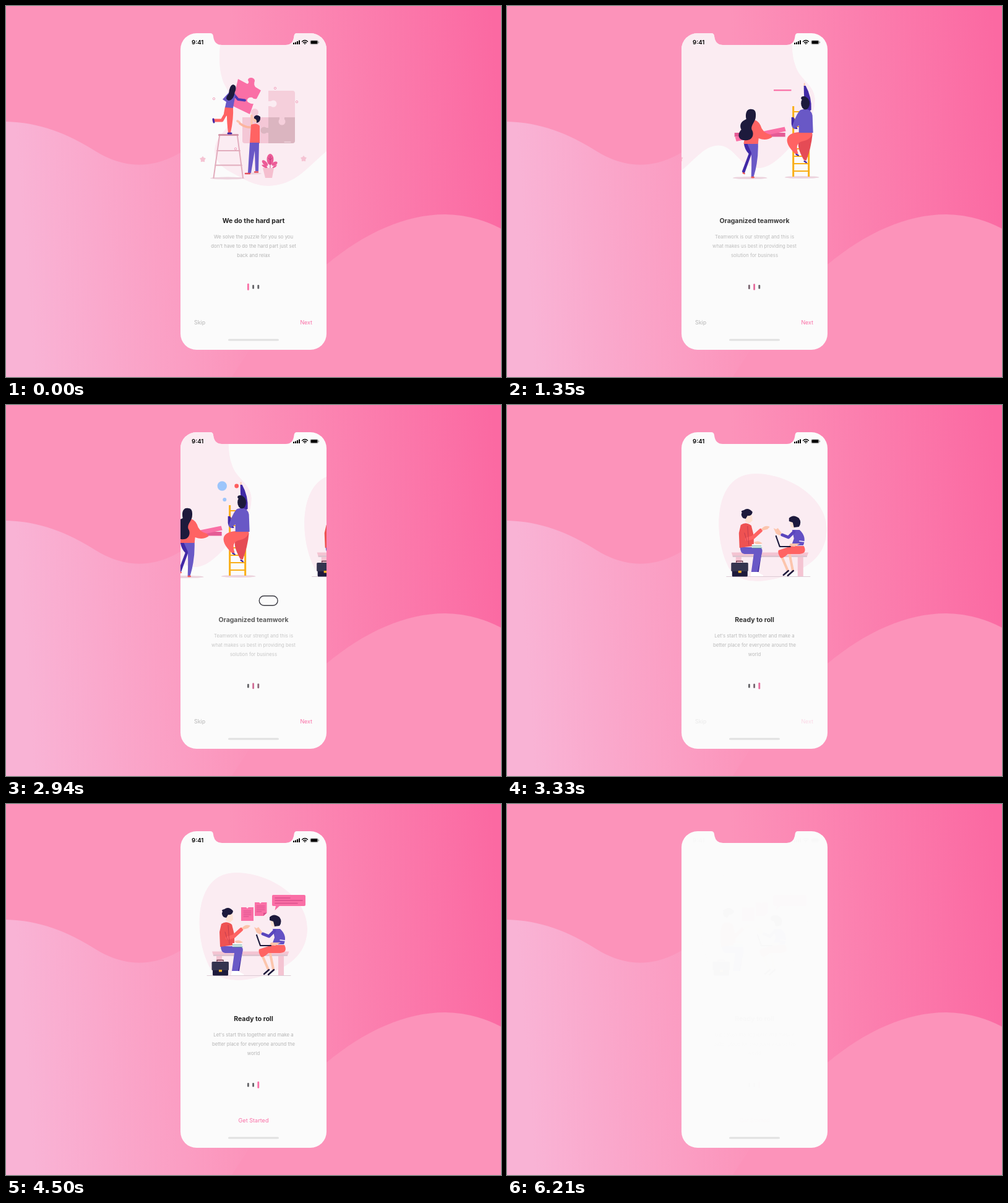
Recreate the animation shown at these times as an HTML page. Size 800 px wide and 600 px high, loop 6.33 s.

```html
<!DOCTYPE html>
<html lang="en">
<head>
<meta charset="utf-8">
<title>Onboarding</title>
<style>
html, body { margin: 0; height: 100%; overflow: hidden; }
svg { display: block; width: 800px; height: 600px; }
text { font-family: Inter, "Open Sans", sans-serif; font-size: 8.9px; }
.title { font-size: 10.5px; font-weight: 700; fill: #222; text-anchor: middle; }
.body { font-size: 7.75px; fill: #b4b4b4; text-anchor: middle; }
.line { fill: none; stroke-linecap: round; stroke-linejoin: round; }
.pop { transform-box: fill-box; transform-origin: center; }
.ink { fill: #1d1a3c; } .red { fill: #ff6363; } .violet { fill: #6958c6; }
.indigo { fill: #4129a6; } .pink { fill: #fa6fa6; } .skin { fill: #fcc5ad; }
.blob { fill: #fbecf2; } .shade { fill: #ecd3dd; }
</style>
</head>
<body>
<svg viewBox="0 0 800 600">
<defs>
  <linearGradient id="base" gradientUnits="userSpaceOnUse" x1="375" y1="215" x2="800" y2="183">
    <stop stop-color="#fc93ba"/><stop offset="1" stop-color="#fb69a2"/>
  </linearGradient>
  <linearGradient id="left" gradientUnits="userSpaceOnUse" x1="30" y1="400" x2="390" y2="373">
    <stop stop-color="#f9b3d5"/><stop offset="1" stop-color="#fc93ba"/>
  </linearGradient>
  <path id="phone" d="M308 44H330Q334.500 44 335 49Q336.500 63 349 63H452Q464 63 465.500 49Q466 44 470 44H492A26 26 0 0 1 518 70V530A26 26 0 0 1 492 556H308A26 26 0 0 1 282 530V70A26 26 0 0 1 308 44Z"/>
  <clipPath id="screen"><use href="#phone"/></clipPath>
  <path id="star" d="M0-4.500L1.500-2.300 4.300-1.500 2.600 1 2.700 3.800 0 3-2.700 3.800-2.600 1-4.300-1.500-1.500-2.300Z" fill="#f5c3d3" stroke="#f5c3d3" stroke-linejoin="round"/>
</defs>

<path fill="url(#base)" d="M0 0H800V600H0Z"/>
<path fill="url(#left)" d="M0 187C52 188 100 206 145 235C190 263 237 264 282 237L400 200V600H0Z"/>
<path fill="#fc93ba" d="M365 600C400 545 455 468 518 418C580 367 645 337 710 337Q758 338 800 360V600Z"/>
<use href="#phone" fill="#fbfbfb"/>
<rect x="359" y="538.500" width="82" height="3" rx="1.500" fill="#e1e1e1"/>

<g id="ui">
<g clip-path="url(#screen)">
<g id="strip">
  <path class="blob" d="M349 44C344 70 342 100 352 125C372 160 372 180 350 205C328 230 336 254 362 268C385 280 400 291 425 291C470 289 488 259 518 235C532 225 545 222 558 230C575 240 582 263 611 262C630 260 648 240 661 226C682 208 699 180 699 150C697 125 674 120 667 95Q661 80 662 44Z"/>

  <!-- page one: puzzle -->
  <g>
    <path d="M424 137H463Q467 137 467 141V180H424Z" fill="#f5cfdb"/>
    <path d="M382 180H424V222H386Q382 222 382 218Z" fill="#f4c7d6"/>
    <path d="M424 180H467V218Q467 222 463 222H424Z" fill="#dbb5c0"/>
    <circle cx="402" cy="172" r="6" fill="#f4cbd8"/><path d="M398 174h8v8h-8z" fill="#f4cbd8"/>
    <circle cx="446" cy="187" r="5.500" fill="#f5cfdb"/><path d="M442 179h8v6h-8z" fill="#f5cfdb"/>
    <circle cx="417" cy="201" r="5.500" fill="#dbb5c0"/><path d="M419 197h6v8h-6z" fill="#dbb5c0"/>
    <circle class="blob" cx="432" cy="158" r="5.500"/><path class="blob" d="M423 154h7v8h-7z"/>
    <path class="line" d="M450 220h10" stroke="#f8e0e8"/>
    <path class="pink" d="M375 118L390 126Q394 124 391 120C391 114 402 115 402 121Q400 127 403 131L412 136.500 405 150Q400 151 398 148C391 146 387 153 392 156Q397 159 400 158L394 175 365 161Z"/>
    <g fill="none" stroke="#f3a5bf">
      <circle cx="336" cy="150" r="1.700"/><circle cx="435" cy="133" r="1.700"/>
      <circle cx="470" cy="155" r="1.700"/><circle cx="371" cy="231" r="1.700"/>
    </g>
    <use href="#star" x="318" y="248"/><use href="#star" x="481" y="247"/>
    <ellipse class="shade" cx="358" cy="278.500" rx="28" ry="2"/>
    <g class="line" stroke="#e2adbd" stroke-width="2">
      <path d="M345 210L335.500 278M374 210L383 278M341 234H378M338 257.500H381"/>
      <path d="M344.500 208.500H374.500" stroke="#d395a8" stroke-width="3"/>
    </g>
    <path class="line" d="M357 171L349 185 336 185" stroke="#ff6363" stroke-width="5"/>
    <path class="red" d="M354 163L367 164Q368 182 363 205H359Q357 188 357 178L352 174Z"/>
    <path class="line" d="M335 183l1 5M359 206h5" stroke="#4129a6" stroke-width="3"/>
    <path class="line" d="M369 144L375 151 386 152.500" stroke="#4c38b4" stroke-width="4"/>
    <path class="violet" d="M361 139L371 142Q369 154 367 165L354 164 356 155 350 151Z"/>
    <path class="ink" d="M367 127C373 128 372 135 370 139Q368 152 360 153C353 151 357 145 360 142Q361 128 367 127Z"/>
    <ellipse class="shade" cx="399" cy="271" rx="14" ry="1.500"/>
    <path class="line" d="M397 191V177M377 188L374 186" stroke="#fcc5ad" stroke-width="3.500"/>
    <path class="line" d="M396 196Q387 197 378 190" stroke="#fcb59f" stroke-width="3.500"/>
    <path class="red" d="M396 192Q405 188 410 194V222H394Z"/>
    <path class="violet" d="M394 221H409L408 267H403L402 234 396 270H391Z"/>
    <path class="line" d="M387 271h7M402 268.500h5" stroke="#e34e5b" stroke-width="2.500"/>
    <circle class="skin" cx="404" cy="183" r="5"/>
    <path class="ink" d="M401 179Q405 174 411 179Q412 188 405 189Q406 183 401 182Z"/>
    <g fill="#ec5c97">
      <ellipse cx="427" cy="248" rx="5.500" ry="9"/>
      <ellipse cx="418.500" cy="254" rx="6" ry="3" transform="rotate(45 418.500 254)"/>
      <ellipse cx="434" cy="255" rx="5" ry="3" transform="rotate(-30 434 255)"/>
      <path d="M413 257Q421 255 423 263H430Q431 258 438 257Q436 263 425 263Q417 263 413 257Z"/>
    </g>
    <path class="line" d="M427 243v19M424 246l3 3 3-3" stroke="#b73579" stroke-width=".8"/>
    <path d="M415 262H433L430 278H419Z" fill="#f5bfcf"/>
  </g>

  <!-- page two: teamwork -->
  <g transform="translate(236)">
    <ellipse class="shade" cx="358" cy="278" rx="28" ry="2"/><ellipse class="shade" cx="442" cy="277" rx="28" ry="2"/>
    <path d="M333 205H415V211.500H333Z" fill="#e45b95"/>
    <path class="pink" d="M334 212L414 195.500 416 202.500 336 219Z"/>
    <path class="indigo" d="M348 221H361V238L349 271 345 268 356 239Q349 232 348 221Z"/>
    <path class="violet" d="M353 221H371Q372 250 364 276H360Q361 250 360 237Z"/>
    <path class="line" d="M347 270l2 1M361 277h3" stroke="#ed5757" stroke-width="2.500"/>
    <path class="skin" d="M360 170L367 174 367 182 361 185Z"/>
    <path class="red" d="M360 183Q371 184 375 193Q378 205 391 208L394 212Q384 219 372 214L371 223H348Q349 207 354 198Z"/>
    <path class="ink" d="M361 167C352 165 350 175 352 183C342 187 341 194 344 200C337 207 339 217 349 217C361 219 365 209 362 202C357 195 366 188 367 181Q369 167 361 167Z"/>
    <g class="line" stroke="#f9ae17">
      <path d="M428 162V276M453 175V276" stroke-width="3" stroke-linecap="butt"/>
      <path d="M428 171h25m-25 12h25m-25 12h25m-25 12h25m-25 12h25m-25 12h25m-25 12h25m-25 12h25m-25 12h25" stroke-width="2"/>
    </g>
    <path class="line" d="M446 125.500v4" stroke="#fcc5ad" stroke-width="2"/>
    <path class="indigo" d="M445 129H448Q458 147 457 168L448 174Q445 150 445 129Z"/>
    <path class="indigo" d="M425 180Q431 178 430 187L435 199Q426 200 425 191Z"/>
    <path d="M441 216L459 207Q457 229 449 250L445 249Q433 228 437 219Z" fill="#e54b55"/>
    <path class="red" d="M437 204H459Q458 216 442 219Q430 222 436 239L432 240C412 221 413 206 437 204Z"/>
    <path class="line" d="M433 240l3 1.500M446 251l3 2" stroke="#4129a6" stroke-width="2.500"/>
    <path class="violet" d="M440 168Q456 163 459 177L460 205H437V193L429 199 426 195Q434 172 440 168Z"/>
    <ellipse class="ink" cx="447.500" cy="157.500" rx="7" ry="10"/><ellipse class="ink" cx="445" cy="149" rx="4.500" ry="3"/>
  </g>

  <!-- page three: bench -->
  <g transform="translate(472)">
    <path class="blob" d="M312.500 195C312 150 328 111 372 111C422 111 487 147 487 202C486 245 455 263 425 274C395 287 345 294 328 262C317 240 313 215 312.500 195Z"/>
    <path class="line" d="M325 277.500H460" stroke="#dccbd4"/>
    <path d="M340 245h9v32h-9zM440 245h9v32h-9z" fill="#f4c4d2"/>
    <path d="M333 238.500H457.500L455 245H335Z" fill="#f4c4d2"/><path d="M335 243.500H455V246H335Z" fill="#dcc4cf"/>
    <path class="line" d="M341 254V252.500H351V254" stroke="#6b3c4d" stroke-width="1.500"/>
    <rect class="ink" x="334" y="265" width="25" height="12.500" rx="1.500"/>
    <rect x="332.500" y="255" width="27.500" height="14" rx="1.500" fill="#34344f"/>
    <rect x="344" y="268" width="5" height="3.500" fill="#f7b32b"/>
    <path d="M372 238H382L377 270H370Z" fill="#3f2ba0"/>
    <path class="violet" d="M347 230H377Q385 231 382 240L375 270H365L369 241H354Q347 240 347 230Z"/>
    <path d="M365 270H374L384 275V277H364Z" fill="#fff"/>
    <path d="M357 178H366L367 187 361 192 355 188Z" fill="#fde2d3"/>
    <path class="ink" d="M352 183Q347 178 350 174Q347 171 353 170Q360 165 367 173Q366 180 359 179L356 184Z"/>
    <path d="M348 194Q356 188 365 195L369 211V228L346 231 345 207Z" fill="#ee5252"/>
    <path class="line" d="M358 217L368 214 380 203" stroke="#ff6363" stroke-width="6" stroke-linecap="butt"/>
    <path class="line" d="M359 196l2 30M354 207l4 13" stroke="#b9374d" stroke-width=".8"/>
    <path class="skin" d="M381 201Q387 193 395 197L391 201 383 203ZM369 222Q377 218 383 224L374 226Z"/>
    <path d="M366 225H382V231H366Z" fill="#f7f7fb"/><path class="line" d="M366 228H381M367 231H382" stroke="#52a690"/>
    <path class="line" d="M415 247L424 268M427 242L432 267" stroke="#fcc5ad" stroke-width="4"/>
    <path class="line" d="M425 268L417 275M433 268L424 276" stroke="#1d1a3c" stroke-width="2.500"/>
    <path class="red" d="M430 228H450Q456 240 443 241H424Q416 249 412 247Q407 239 409 235Z"/>
    <path d="M427 187H433L435 200 429 197Z" fill="#fde2d3"/>
    <path d="M431 202H443Q455 213 449 227H430L434 216Z" fill="#6350c4"/>
    <path class="line" d="M434 205L425 214 415 210" stroke="#5945bd" stroke-width="5"/>
    <path class="line" d="M443 220l8 1" stroke="#f6f2ff" stroke-width="1.500"/>
    <path class="ink" d="M426 183Q433 176 442 183Q447 190 442 197L434 198 432 190 426 188Z"/>
    <path class="skin" d="M401 199L405 201 408 199 414 207 411 211 405 208ZM428 224L444 224 435 229 426 228Z"/>
    <path class="line" d="M405 212L411 229H428" stroke="#1d1a3c" stroke-width="2.200"/>
  </g>
</g>
</g>

<g id="pops">
  <rect class="pop pink" data-in="1314" data-out="2690" x="404" y="133" width="82.500" height="6.500"/>
  <rect class="pop pink" data-in="1480" data-out="2640" x="404" y="121" width="82.500" height="6.500"/>
  <circle class="pop" data-in="1560" data-out="2960" cx="349.300" cy="131" r="7.700" fill="#9cc5fb"/>
  <circle class="pop" data-in="1640" data-out="3000" cx="372.700" cy="131" r="3.400" fill="#ff5d5d"/>
  <circle class="pop" data-in="1700" data-out="3040" cx="353.300" cy="153" r="3" fill="#9cc5fb"/>
  <g class="pop" data-in="3610">
    <path class="pink" d="M432 147H482Q484 147 484 149V163Q484 165 482 165H442L434.500 172 436 165H432Q430 165 430 163V149Q430 147 432 147Z"/>
    <path class="line" d="M435 152h24m-24 4h44m-44 4.500h36" stroke="#d94f8c" stroke-width="1.500"/>
  </g>
  <g class="pop" data-in="3900">
    <path class="pink" d="M380 167H388L390 169 392 167H400V189H380Z"/>
    <path class="line" d="M384 173h12m-12 3h12m-12 3h12m-12 3h8" stroke="#d94f8c"/>
  </g>
  <g class="pop" data-in="4050">
    <path class="pink" d="M402 159H409L411 161 413 159H421.500V176L416 181H402Z"/>
    <path class="line" d="M405 165h13m-13 3h13m-13 3h13m-13 3h8" stroke="#d94f8c"/>
    <path d="M416 181V176H421.500Z" fill="#d94f8c"/>
  </g>
</g>

<text x="300" y="62" style="font-size:9.6px;font-weight:600">9:41</text>
<path d="M464 59.500h2v2.500h-2zM467 58.500h2v3.500h-2zM470 57h2v5h-2zM473 55.500h2v6.500h-2z"/>
<path class="line" d="M478.500 57.500q4.500-4 9 0M480.500 59.500q2.500-2.200 5 0" stroke="#000" stroke-width="1.400"/>
<circle cx="483" cy="61" r="1"/>
<rect x="491.500" y="55.500" width="13" height="6.500" rx="1.800" fill="none" stroke="#999" stroke-width=".6"/>
<rect x="492.500" y="56.300" width="11" height="5" rx="1"/><path d="M505 57.500h1v2.500h-1z" fill="#999"/>

<g id="copy"></g>
<g id="dots"></g>
<g id="nav"><text x="304" y="515" fill="#b4b4b4">Skip</text><text x="495" y="515" fill="#fa6fa6" text-anchor="end">Next</text></g>
<text id="start" x="400" y="515" fill="#fa6fa6" text-anchor="middle" style="font-size:9.100px">Get Started</text>
</g>
<rect id="cursor" fill="none" stroke="#3a3a42" stroke-width="1.400"/>
</svg>

<script>
const LOOP = 6330, PAGE = 236, SWIPES = [540, 2490], TAP = 4950, FADE = 5590;
const $ = id => document.getElementById(id);
const clamp = v => Math.min(1, Math.max(0, v));
const ramp = (t, from, to) => clamp((t - from) / (to - from));
const smooth = u => u * u * (3 - 2 * u);
const mix = (a, b, u) => a + (b - a) * u;
const set = (el, attrs) => { for (const k in attrs) el.setAttribute(k, attrs[k]); };

const pages = [
  ["We do the hard part", "We solve the puzzle for you so you", "don't have to do the hard part just set", "back and relax"],
  ["Oraganized teamwork", "Teamwork is our strengt and this is", "what makes us best in providing best", "solution for business"],
  ["Ready to roll", "Let's start this together and make a", "better place for everyone around the", "world"]
];
$("copy").innerHTML = pages.map(([title, ...lines]) =>
  `<g><text class="title" x="400" y="351">${title}</text>` +
  lines.map((s, i) => `<text class="body" x="400" y="${375.5 + 15.1 * i}">${s}</text>`).join("") + "</g>").join("");
$("dots").innerHTML = pages.map((_, i) => `<rect x="${390 + 8.2 * i}" width="2.800" rx="1.200"/>`).join("");
const copy = [...$("copy").children], dots = [...$("dots").children], pops = [...$("pops").children];

// Critically damped spring, released after the finger starts to drag
function slide(t) {
  const x = Math.max(0, (t - 291) / 153);
  return 1 - (1 + x) * Math.exp(-x);
}

function backOut(u) {
  const v = u - 1;
  return 1 + 2.70158 * v ** 3 + 1.70158 * v * v;
}

function drawCursor(t) {
  let x, y, w = 16, opacity;
  if (t >= TAP) {
    const s = t - TAP, u = smooth(ramp(s, 0, 450));
    x = mix(443, 405, u);
    y = mix(480, 511, u);
    w -= 4 * ramp(s, 460, 540);
    opacity = ramp(s, 0, 150) * (1 - ramp(s, 500, 630));
  } else {
    const s = t - (t < SWIPES[1] ? SWIPES[0] : SWIPES[1]), u = ramp(s, 200, 750);
    x = mix(512, 310, smooth(u));
    y = 316.5;
    w += 14 * Math.sin(Math.PI * u);
    opacity = ramp(s, 0, 180) * (1 - ramp(s, 650, 800));
  }
  const h = Math.min(w, t >= TAP ? 16 : 15.5);
  set($("cursor"), { x: x - w / 2, y: y - h / 2, width: w, height: h, rx: h / 2, opacity });
}

function frame(now) {
  const t = now % LOOP;
  const p = slide(t - SWIPES[0]) + slide(t - SWIPES[1]);
  set($("strip"), { transform: `translate(${-PAGE * p})` });

  copy.forEach((el, i) => {
    const d = p - i;
    set(el, { opacity: clamp(1 - (d / (d > 0 ? 0.55 : 0.45)) ** 2) });
  });
  dots.forEach((el, i) => {
    const on = clamp(1 - Math.abs(p - i)), h = mix(6.5, 11, on);
    set(el, { y: 454.3 - h / 2, height: h, fill: `rgb(${mix(100, 250, on)},${mix(100, 111, on)},${mix(104, 166, on)})` });
  });
  pops.forEach(el => {
    const out = +el.dataset.out || Infinity;
    const s = backOut(ramp(t, +el.dataset.in, +el.dataset.in + 450)) * (1 - (t > out ? ramp(t, out, out + 200) ** 2 : 0));
    el.style.transform = `scale(${s})`;
  });

  const since = t - SWIPES[1];
  set($("nav"), { opacity: 1 - ramp(since, 660, 900) });
  set($("start"), { opacity: ramp(since, 850, 1150) });
  set($("ui"), { opacity: 1 - 0.985 * ramp(t, FADE, 6210) });
  drawCursor(t);
  requestAnimationFrame(frame);
}
requestAnimationFrame(frame);
</script>
</body>
</html>
```
